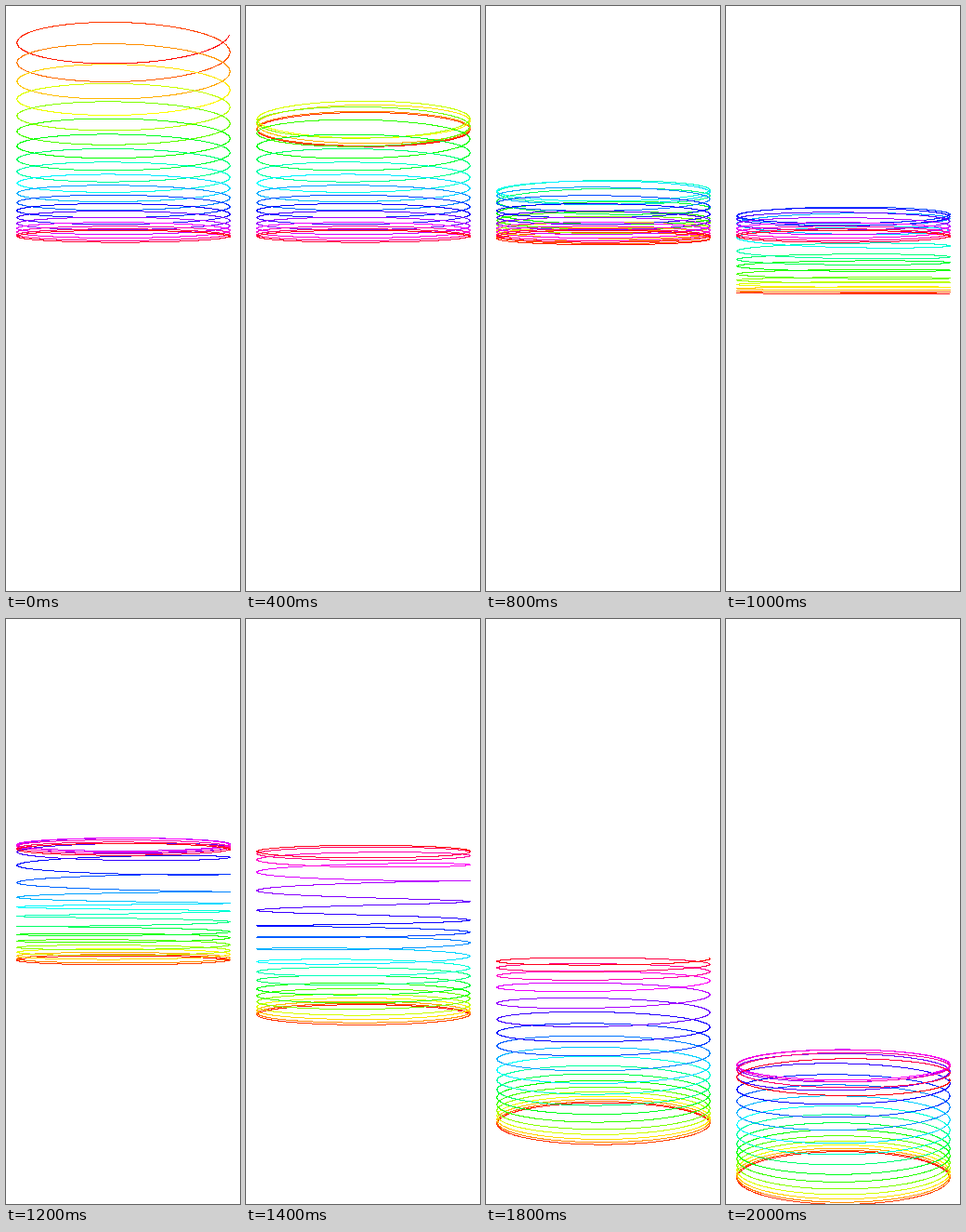
Recreate the animation shown at these times as an HTML page with a canvas. Size 252 px wide and 629 px high, loop 2.1 s.

```html
<!DOCTYPE html>
<html lang="en">
<head>
<meta charset="utf-8">
<title>Falling spring</title>
<style>
  html, body { margin: 0; width: 252px; height: 629px; overflow: hidden; background: #fff; }
  canvas { display: block; }
</style>
</head>
<body>
<canvas id="stage" width="252" height="629"></canvas>
<script>
const ctx = document.getElementById('stage').getContext('2d');

const STEP_MS = 100, STEPS = 21;
const MASSES = 20, TURNS = MASSES - 1;
const TOP = 31;          // height of the upper end while hanging
const SAG = 1.147;       // stretch of the lowest link
const RATE = 1.2625;     // spring time units per step
const CX = 126.5, HORIZON = 314.5, RADIUS = 114, DEPTH = 0.1;
const DOTS = 840, RUN = 20;

// Hanging chain: each link carries the weight of all masses below it.
const rest = [TOP];
for (let i = 0; i < TURNS; i++) rest.push(rest[i] + SAG * (TURNS - i));
const mean = rest.reduce((a, b) => a + b) / MASSES;

// Normal modes of a free chain, so each pose is a direct function of time.
const shape = (k, i) => Math.cos(Math.PI * k * (i + 0.5) / MASSES);
const modes = [];
for (let k = 1; k < MASSES; k++) {
  modes.push({
    k,
    omega: 2 * Math.sin(Math.PI * k / (2 * MASSES)),
    amp: 2 / MASSES * rest.reduce((sum, y, i) => sum + y * shape(k, i), 0)
  });
}

function heights(u) {
  const centre = mean + SAG * u * u / 2;
  return rest.map((_, i) => modes.reduce(
    (y, m) => y + m.amp * Math.cos(m.omega * u) * shape(m.k, i), centre));
}

function draw(step) {
  const ys = heights(step * RATE);
  ctx.fillStyle = '#fff';
  ctx.fillRect(0, 0, 252, 629);
  for (let n = 0; n <= TURNS * DOTS; n++) {
    const turn = n / DOTS;
    const i = Math.min(Math.floor(turn), TURNS - 1);
    const y = ys[i] + (ys[i + 1] - ys[i]) * (turn - i);
    const angle = turn * 2 * Math.PI;
    const scale = 1 / (1 + DEPTH * Math.sin(angle));
    if (n % RUN === 0) ctx.fillStyle = `hsl(${360 * turn / TURNS}, 100%, 50%)`;
    ctx.fillRect(
      Math.floor(CX + RADIUS * Math.cos(angle) * scale),
      Math.floor(HORIZON + (y - HORIZON) * scale), 1, 1);
  }
}

const start = performance.now();
let shown = -1;
function tick() {
  const step = Math.floor((performance.now() - start) / STEP_MS) % STEPS;
  if (step !== shown) draw(shown = step);
  requestAnimationFrame(tick);
}
tick();
</script>
</body>
</html>
```
